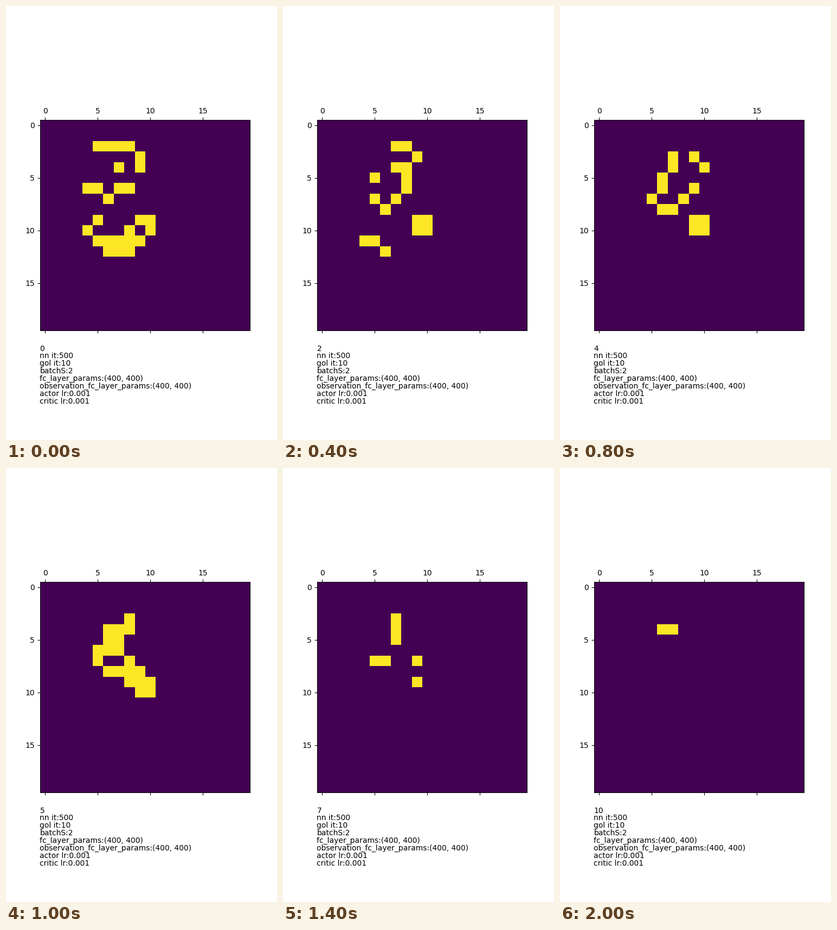
A matplotlib script for the animation above (8000 ms loop, 500x800 px).

```python
import numpy as np
import matplotlib.pyplot as plt
from matplotlib.animation import FuncAnimation

WIDTH, HEIGHT, DPI = 500, 800, 100
SIZE = 20
GENERATIONS = 10
INTERVAL, FRAMES = 200, 40

START = {
    2: (5, 6, 7, 8), 3: (9,), 4: (7, 9),
    6: (4, 5, 7, 8), 7: (6,),
    9: (5, 9, 10), 10: (4, 8, 10),
    11: (5, 6, 7, 8, 9), 12: (6, 7, 8),
}
SETTINGS = [
    "nn it:500",
    "gol it:10",
    "batchS:2",
    "fc_layer_params:(400, 400)",
    "observation_fc_layer_params:(400, 400)",
    "actor lr:0.001",
    "critic lr:0.001",
]


def step(grid):
    """One Game of Life generation; the outer two rings always stay dead."""
    shifts = [(dy, dx) for dy in (-1, 0, 1) for dx in (-1, 0, 1) if dy or dx]
    neighbours = sum(np.roll(grid, shift, axis=(0, 1)) for shift in shifts)
    alive = (neighbours == 3) | ((grid == 1) & (neighbours == 2))
    result = np.zeros_like(grid)
    result[2:-2, 2:-2] = alive[2:-2, 2:-2]
    return result


def build_history():
    grid = np.zeros((SIZE, SIZE), dtype=int)
    for row, columns in START.items():
        grid[row, list(columns)] = 1
    history = [grid]
    for _ in range(GENERATIONS):
        history.append(step(history[-1]))
    return history


plt.rcParams["font.family"] = "DejaVu Sans"
plt.rcParams["font.size"] = 10

history = build_history()
fig = plt.figure(figsize=(WIDTH / DPI, HEIGHT / DPI), dpi=DPI)
ax = fig.add_subplot()
image = ax.matshow(history[0], cmap="viridis", vmin=0, vmax=1)
ax.set_xticks(range(0, SIZE, 5))
ax.set_yticks(range(0, SIZE, 5))


def label(y, text):
    """Left-aligned line of text, y in pixels from the top."""
    return fig.text(0.125, 1 - y / HEIGHT, text)


counter = label(636, "0")
for i, line in enumerate(SETTINGS):
    label(649 + 14 * i, line)


def update(frame):
    generation = min(frame, GENERATIONS)
    image.set_data(history[generation])
    counter.set_text(str(generation))
    return image, counter


animation = FuncAnimation(fig, update, frames=FRAMES, interval=INTERVAL,
                          repeat=True, repeat_delay=0)
plt.show()
```
